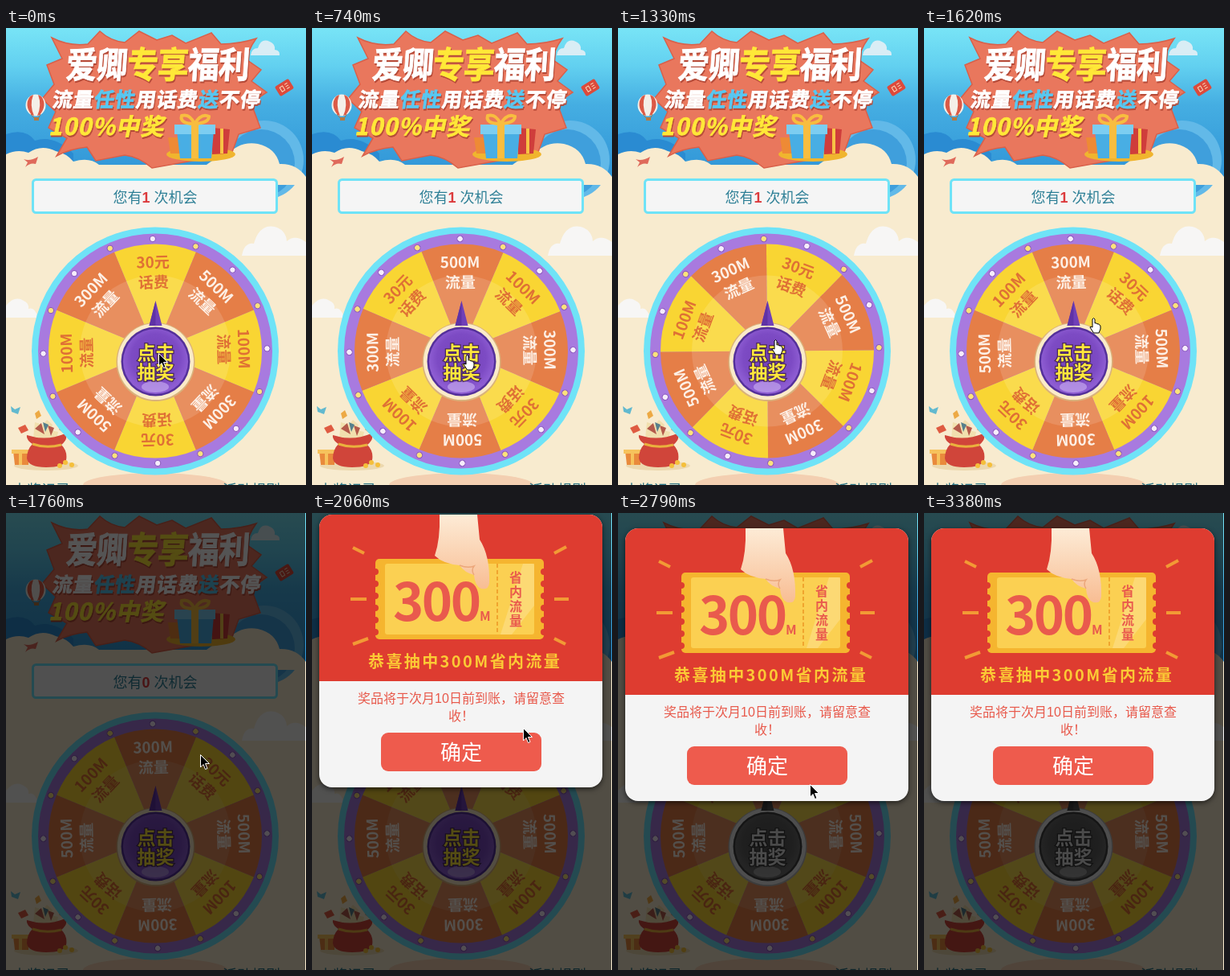
Animation, 374 px wide and 568 px high, one loop 4.13 s. Source, as an HTML page:

```html
<!DOCTYPE html>
<html lang="zh-CN">
<head>
<meta charset="utf-8">
<style>
html, body { margin: 0; width: 100%; height: 100%; overflow: hidden; background: #f8ebcf; }
svg { display: block; width: 374px; height: 568px; font-family: "Noto Sans CJK SC", "Noto Sans SC", "Noto Sans", sans-serif; }
.title { font-weight: 900; fill: #fff; stroke: #fff; stroke-width: .8px; filter: drop-shadow(1px 2px 0 #b54a38); }
.gold { fill: #ffe838; stroke: #ffe838; }
.blue { fill: #57c8f2; stroke: #57c8f2; }
.bold { font-weight: 700; }
.mid { text-anchor: middle; }
.ui { font-family: "Liberation Sans", "Noto Sans CJK SC", sans-serif; }
#modal { filter: drop-shadow(0 2px 3px rgba(0,0,0,.6)); }
</style>
</head>
<body>
<svg viewBox="0 0 374 568">
  <defs>
    <linearGradient id="sky" x2="0" y2="1">
      <stop stop-color="#78e4f6"/><stop offset=".25" stop-color="#62d0f0"/>
      <stop offset=".5" stop-color="#45aee2"/><stop offset="1" stop-color="#2f93d6"/>
    </linearGradient>
    <linearGradient id="skin" x2="0" y2="1">
      <stop stop-color="#fdebd6"/><stop offset="1" stop-color="#f8bd93"/>
    </linearGradient>
    <radialGradient id="orb" cy=".45">
      <stop stop-color="#7340b8"/><stop offset=".75" stop-color="#7d4bc4"/><stop offset="1" stop-color="#8d5cd2"/>
    </radialGradient>
    <clipPath id="card"><rect x="9" y="19" width="353" height="339" rx="16"/></clipPath>
  </defs>

  <!-- Scenery -->
  <rect width="374" height="568" fill="#f8ebcf"/>
  <rect width="374" height="190" fill="url(#sky)"/>
  <path d="M0 132Q24 124 36 140Q60 132 84 156V190H0Z" fill="#2a8bd2"/>
  <circle cx="322" cy="164" r="49" fill="#62b9e8"/><circle cx="318" cy="168" r="42" fill="#3f9fdc"/>
  <path d="M0 157Q14 150 28 155Q44 144 62 153Q76 156 84 166Q104 160 116 170H250Q262 160 274 160Q290 140 314 144Q336 149 341 169Q362 168 374 185V195H0Z" fill="#f8ebcf"/>
  <path d="M305 34Q306 25 314 25Q318 12 329 17Q336 20 335 27Q342 28 341 34Z" fill="#d9edf5"/>
  <path d="M294 283Q297 266 309 268Q316 243 335 247Q349 251 350 265Q360 256 374 266V283Z" fill="#f7f6f5"/>
  <path d="M0 345Q11 332 22 339Q29 342 28 349Q36 346 40 360H0Z" fill="#f7f6f5"/>

  <!-- Header -->
  <path d="M57 12Q78 23 102 20L117 4Q130 16 148 18L166 4 188 15 207 9 224 19 256 6 268 20Q290 20 312 13Q301 28 301 40L318 52 306 66 325 80Q308 90 308 100L317 124 290 132 282 154Q260 158 238 164L182 174Q166 160 148 158L112 165 101 148Q80 150 63 159L76 137 53 124 62 104 45 88 60 70 51 46 70 38Z" fill="#e9775d" stroke="#d9604a" stroke-width="1.500"/>
  <g transform="translate(37 96)">
    <ellipse rx="12.5" ry="13.5" fill="#f4efe8"/>
    <path d="M-7 -11Q-15 0 -5 12L-2 13Q-8 0 -3 -13ZM3 -13Q8 0 2 13L5 12Q15 0 7 -11Z" fill="#db5a47"/>
    <path d="M-6 11L-1 17M6 11L3 17" stroke="#a8724a"/><rect x="-2" y="15" width="6" height="4" fill="#b67942"/>
  </g>
  <g transform="rotate(-32 347 74)">
    <rect x="337" y="67" width="20" height="14" rx="2" fill="#dd4a3b"/>
    <path d="M342 71h4v6h-4zM349 71h4M349 74h4M349 77h4" stroke="#f8d7b8" fill="none"/>
  </g>
  <path d="M22 163Q30 166 40 160L37 169Q30 167 24 173L27 167Z" fill="#df6a5b"/>
  <g class="title">
    <text transform="translate(74 62) skewX(-4) scale(1 1.15)" font-size="39" letter-spacing="-1">爱卿<tspan class="gold">专享</tspan>福利</text>
    <text transform="translate(57 98) skewX(-8)" font-size="25" letter-spacing="1">流量<tspan class="blue">任性</tspan>用话费<tspan class="blue">送</tspan>不停</text>
    <text class="gold" transform="translate(53 133) skewX(-12)" font-size="29" letter-spacing="1.2">100%中奖</text>
  </g>
  <ellipse cx="243" cy="157" rx="43" ry="9" fill="#f0b52e"/>
  <path d="M257 124l22 2-3 30-19 1z" fill="#cf3d3b"/><path d="M267 125h4v31h-4z" fill="#f7c245"/>
  <path d="M202 136h18v20h-15z" fill="#ee8a35"/>
  <path d="M213 128h46l-3 34h-39z" fill="#48aee4"/><rect x="210" y="120" width="51" height="12" fill="#7ccdf1"/>
  <path d="M231 120h9v42h-9z" fill="#f8bd3f"/>
  <path d="M235 119Q216 119 219 109Q229 106 235 119Q244 105 253 110Q253 118 235 119Z" fill="none" stroke="#f8bd3f" stroke-width="4"/>

  <!-- Chances left -->
  <rect x="33.5" y="188.5" width="304" height="41" rx="4" fill="#f5f5f5" stroke="#6fe3f7" stroke-width="3"/>
  <text class="ui mid" x="186" y="217" font-size="18" font-weight="500" fill="#2f8097">您有<tspan id="count" class="bold" fill="#dc3a3c">1</tspan> 次机会</text>

  <!-- Foot of the page -->
  <ellipse cx="186" cy="568" rx="90" ry="15" fill="#f3cfb1"/>
  <g font-size="18" font-weight="500" fill="#2b7586">
    <text x="8" y="581">中奖记录</text><text x="270" y="581">活动规则</text>
  </g>
  <ellipse cx="50" cy="544" rx="40" ry="6" fill="#ecd8ae"/>
  <path d="M9 526h19v17H11z" fill="#e98a3c"/><path d="M7 524h22v5H7zM16 524h4v19h-4z" fill="#f6c25c"/>
  <path d="M34 510l2-20 10 3 5-6 7 6-2 7 9 2-2 10z" fill="#f1dfae"/>
  <path d="M36 498l8-7 4 14zM52 494l8 3-4 10z" fill="#b45a4b"/><path d="M46 490l7 3-4 9z" fill="#56808c"/>
  <path d="M26 506Q50 514 74 504Q78 511 69 518Q77 526 75 537Q72 546 50 546Q28 546 26 535Q26 524 33 517Q25 512 26 506Z" fill="#d0453a"/>
  <path d="M33 517Q50 523 69 518" fill="none" stroke="#eab13d" stroke-width="3"/>
  <g fill="#f5bf3b"><circle cx="74" cy="540" r="3"/><circle cx="82" cy="543" r="3"/><circle cx="67" cy="544" r="3"/></g>
  <path d="M6 470l5 4 7-3-3 9-8-3z" fill="#62b9cf"/><path d="M15 497l9-4 4 7-9 4z" fill="#df5b42"/>
  <path d="M36 479l5-4 3 7-6 4z" fill="#eda944"/><path d="M69 493l7 4-5 6-5-4zM79 507l7-3-1 7z" fill="#df7b45"/>

  <!-- Wheel -->
  <circle cx="186" cy="401.5" r="154" fill="#6fe3f7"/>
  <g id="wheel"></g>
  <g id="hub">
    <circle cx="186.5" cy="415" r="49" fill="#d9b27c"/>
    <circle cx="186.5" cy="414.5" r="47.5" fill="#fbebc9"/>
    <path d="M186.500 339L194.500 370H178.500Z" fill="#7040b8"/><path d="M186.500 339V370H178.500Z" fill="#5f32a6"/>
    <circle cx="186.5" cy="414.5" r="43" fill="#54309a"/>
    <circle cx="186.5" cy="414.5" r="40.5" fill="url(#orb)"/>
    <ellipse cx="186" cy="446" rx="17" ry="7" fill="#c4a6ee" opacity=".7"/>
    <g class="bold mid" font-size="23" fill="#ffe83b" stroke="#4a2a5d" stroke-width="2.5" paint-order="stroke">
      <text x="186.5" y="412">点击</text><text x="186.5" y="436">抽奖</text>
    </g>
  </g>

  <rect id="shade" width="373" height="568" opacity=".67"/>

  <!-- Prize -->
  <g id="modal"><g clip-path="url(#card)">
    <rect x="9" y="19" width="353" height="339" fill="#f4f4f4"/>
    <rect x="9" y="19" width="353" height="207" fill="#de3c30"/>
    <path d="M51 60L65 67M48 124H68M51 180L70 173M317 59L302 67M302 124H320M316 180L302 173" stroke="#f29a35" stroke-width="4"/>
    <rect x="79" y="74" width="210" height="100" rx="5" fill="#f5b52f"/>
    <path id="notches" fill="#de3c30"/>
    <rect x="91" y="80" width="186" height="88" rx="3" fill="#fbd052"/>
    <path d="M263 80H277V132L249 168H235Z" fill="#fde08a" opacity=".6"/>
    <path d="M231 80V168" stroke="#f0a42e" stroke-width="2" stroke-dasharray="5 3"/>
    <g class="bold" fill="#e95a4d">
      <text x="101" y="151" font-size="65" letter-spacing="-2.5">300</text><text x="209" y="151" font-size="16">M</text>
      <g class="mid" font-size="16">
        <text x="254" y="103">省</text><text x="254" y="121">内</text><text x="254" y="139">流</text><text x="254" y="157">量</text>
      </g>
    </g>
    <path d="M159 19H206L209 50Q222 70 221 104Q220 113 211 111Q203 108 202 94Q190 91 184 82Q163 80 153 70Q160 50 159 19Z" fill="url(#skin)"/>
    <path d="M184 82Q194 86 202 83Q198 88 202 94" fill="none" stroke="#eca77b" stroke-width="1.5"/>
    <text class="bold" x="70" y="209" font-size="20" letter-spacing="2.4" fill="#fbca35">恭喜抽中300M省内流量</text>
    <g class="ui mid" font-size="16" fill="#e8594b">
      <text x="186" y="253">奖品将于次月10日前到账，请留意查</text><text x="186" y="275">收！</text>
    </g>
    <rect x="86" y="290" width="200" height="48" rx="9" fill="#ee5b4d"/>
    <text class="mid" x="186" y="323.5" font-size="26" fill="#fff">确定</text>
  </g></g>

  <g id="pointer" stroke-linejoin="round">
    <path id="arrow" d="M.5 .5V16L4 12.5 6.5 18.5 9 17.5 6.5 11.5H11.5Z" fill="#000" stroke="#fff"/>
    <path id="hand" d="M4 9V2Q5.500 -1 7 2V7Q9 6 10 8Q12 7 12.500 9Q14 9 14 11V14L12 19H5.500L1 12Q1 10 4 12Z" fill="#fff" stroke="#000"/>
  </g>
</svg>
<script>
const $ = id => document.getElementById(id);
const LOOP = 4130, START = 590, TICK = 147, CX = 186, CY = 401.5;
const polar = (r, deg) => {
  const a = deg * Math.PI / 180;
  return [CX + r * Math.sin(a), CY - r * Math.cos(a)].map(v => v.toFixed(2)).join(' ');
};

function buildWheel() {
  const prizes = ['30元', '500M', '100M', '300M'];
  let out = `<circle cx="${CX}" cy="${CY}" r="146" fill="#a87adf"/>`;
  for (let i = 0; i < 8; i++) {
    const a = i * 45, odd = i % 2;
    out += `<path d="M${CX} ${CY}L${polar(133, a - 22.5)}A133 133 0 0 1 ${polar(133, a + 22.5)}Z" fill="${odd ? '#e57e47' : '#f9d533'}"/>`;
  }
  out += `<circle cx="${CX}" cy="${CY}" r="94" fill="#fff" opacity=".13"/>`;
  for (let i = 0; i < 8; i++) {
    out += `<g class="mid bold" font-size="19" transform="rotate(${i * 45 - 1.5} ${CX} ${CY})" fill="${i % 2 ? '#fdf0e6' : '#df7035'}">
      <text x="${CX}" y="298">${prizes[i % 4]}</text><text x="${CX}" y="323">${i % 4 ? '流量' : '话费'}</text></g>`;
  }
  for (let i = 0; i < 16; i++) {
    const [x, y] = polar(139.5, i * 22.5 - 1.3).split(' ');
    out += `<circle cx="${x}" cy="${y}" r="3.7" fill="${i % 2 ? '#fbe27c' : '#f6ecfb'}" stroke="#8653bb"/>`;
  }
  $('wheel').innerHTML = out;
}

function buildNotches() {
  let d = '';
  for (let y = 86; y < 170; y += 15) d += `M79 ${y}a4 4 0 0 1 0 8ZM289 ${y}a4 4 0 0 0 0 8Z`;
  $('notches').setAttribute('d', d);
}

// Pointer stops: tick, x, y
const stops = [
  [-1, 190, 404], [0, 188, 406], [1, 188, 406], [5, 191, 387], [7, 206, 360], [8, 242, 300],
  [9, 257, 275], [10, 263, 267], [11, 264, 258], [12, 267, 253], [13, 267, 252],
  [14, 259, 263], [15, 239, 337], [16, 267, 435], [17, 281, 490], [18, 296, 521]
];
function pointerAt(n) {
  const j = Math.max(1, stops.findIndex(s => s[0] >= n));
  const [a, x0, y0] = stops[j - 1], [b, x1, y1] = stops[j], u = (n - a) / (b - a);
  return [x0 + (x1 - x0) * u, y0 + (y1 - y0) * u];
}

// Cubic ease-out over 585 degrees, ending with 300M on top
const spin = t => 45 - 585 * Math.min(1, Math.max(0, (1672 - t) / 1021)) ** 3;
const show = (id, on) => $(id).setAttribute('display', on ? 'inline' : 'none');
const move = (id, x, y) => $(id).setAttribute('transform', `translate(${x} ${y})`);

function draw() {
  const t = performance.now() % LOOP;
  // The picture advances in even ticks after the first pause
  const n = Math.max(-1, Math.floor((t - START + 9) / TICK));
  $('wheel').setAttribute('transform', `rotate(${spin(START + n * TICK)} ${CX} ${CY})`);
  $('count').textContent = n < 8 ? 1 : 0;
  show('shade', n >= 8);
  show('modal', n >= 10);
  move('modal', 0, n < 11 ? -17 : 0);
  $('hub').style.filter = n < 11 ? 'none' : 'grayscale(1)';
  show('pointer', n < 19);
  if (n < 19) move('pointer', ...pointerAt(n));
  const over = n >= 0 && n < 8;
  show('hand', over);
  show('arrow', !over);
  requestAnimationFrame(draw);
}

buildWheel();
buildNotches();
draw();
</script>
</body>
</html>
```
